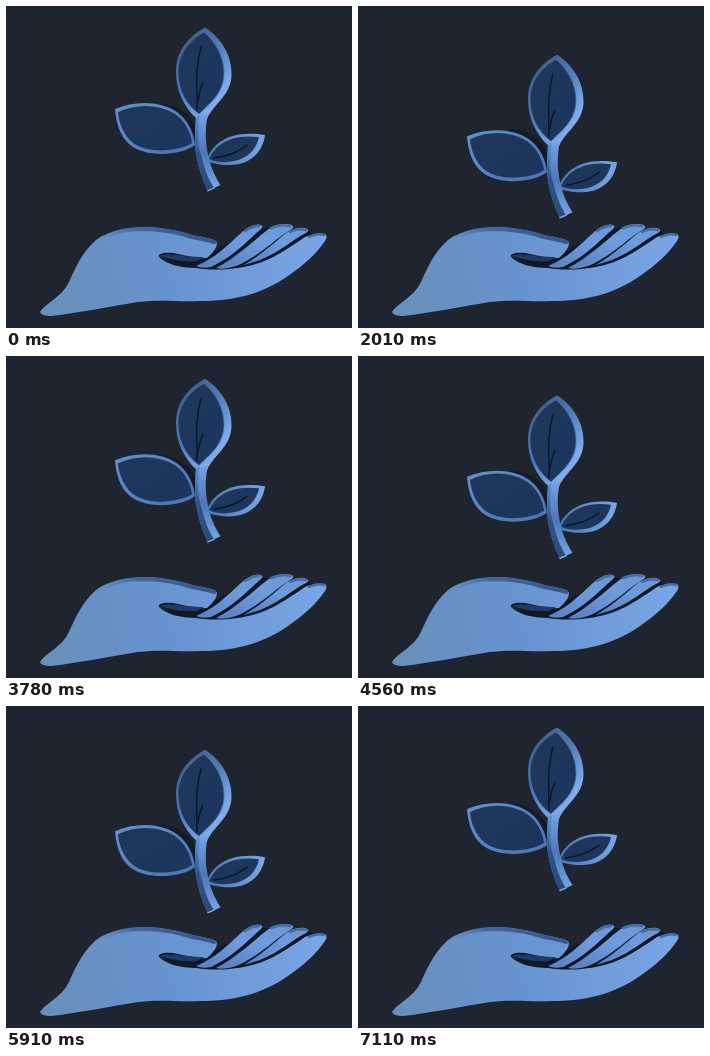
Recreate the animation shown at these times as an HTML page. Size 346 px wide and 322 px high, loop 7.14 s.

```html
<!DOCTYPE html>
<html lang="en">
<head>
<meta charset="utf-8">
<title>Hand and floating sprout</title>
<style>
  html, body { margin: 0; width: 100%; height: 100%; overflow: hidden; background: #1e2530; }
  svg { display: block; width: 346px; height: 322px; }
</style>
</head>
<body>
<svg viewBox="0 0 346 322" fill="none" stroke-linecap="round" stroke-linejoin="round">
  <defs>
    <linearGradient id="palm" gradientUnits="userSpaceOnUse" x1="40" y1="300" x2="320" y2="235">
      <stop offset="0" stop-color="#6890bb"/>
      <stop offset=".45" stop-color="#6793d0"/>
      <stop offset="1" stop-color="#7aa6e6"/>
    </linearGradient>
    <linearGradient id="bevel" gradientUnits="userSpaceOnUse" x1="95" y1="0" x2="212" y2="0">
      <stop offset="0" stop-color="#4a72a8" stop-opacity="0"/>
      <stop offset=".3" stop-color="#41669d"/>
      <stop offset="1" stop-color="#35568c"/>
    </linearGradient>
    <linearGradient id="finger" x1="0" y1="1" x2="1" y2="0">
      <stop offset="0" stop-color="#5580be"/>
      <stop offset=".6" stop-color="#6f9cdd"/>
      <stop offset="1" stop-color="#6a96d4"/>
    </linearGradient>
    <linearGradient id="face" x1="0" y1="0" x2="1" y2="1">
      <stop offset="0" stop-color="#20375a"/>
      <stop offset="1" stop-color="#1b355f"/>
    </linearGradient>
    <linearGradient id="leftRim" x1="0" y1="0" x2="1" y2="1">
      <stop offset="0" stop-color="#6490cc"/>
      <stop offset="1" stop-color="#4a74b0"/>
    </linearGradient>
    <linearGradient id="rightRim" x1="0" y1="0" x2="1" y2="0">
      <stop offset="0" stop-color="#4a74b0"/>
      <stop offset="1" stop-color="#7ba7e6"/>
    </linearGradient>
    <linearGradient id="topRim" gradientUnits="userSpaceOnUse" x1="172" y1="40" x2="222" y2="78">
      <stop offset="0" stop-color="#435d80"/>
      <stop offset=".5" stop-color="#4f7ab6"/>
      <stop offset="1" stop-color="#7fabe9"/>
    </linearGradient>
    <linearGradient id="stemFront" x1="0" y1="0" x2="0" y2="1">
      <stop offset="0" stop-color="#6694d4"/>
      <stop offset=".5" stop-color="#2f5388"/>
      <stop offset="1" stop-color="#294a7c"/>
    </linearGradient>
    <linearGradient id="stemSide" x1="0" y1="0" x2="0" y2="1">
      <stop offset="0" stop-color="#75a2e2"/>
      <stop offset=".5" stop-color="#4c78b8"/>
      <stop offset="1" stop-color="#7ba7e6"/>
    </linearGradient>
  </defs>

  <g id="hand">
    <path fill="#0e1828" d="M152 247 L206 246 L250 222 L284 222 L300 225 L314 230 L275 262 L215 268 L170 262Z"/>
    <path fill="url(#palm)" d="M34 306 C42 295 55 292 63 276 C71 258 77 246 90 234
      C103 224 125 221 141 221 C160 222 174 225 186 229 C195 231 205 232 210 235
      C213 239 208 246 201 252 C192 253 178 249 167 247 C158 246 151 248 153 251
      C160 258 174 262 190 262 C214 266 240 262 256 256 C272 250 287 239 299 231
      Q311 226 319 228 Q322 230 319 235 C310 248 298 259 282 270
      C260 285 234 295 195 295 C170 296 156 293 132 296 C105 300 73 307 45 310 Q35 310 34 306Z"/>
    <path stroke="url(#bevel)" stroke-width="4" d="M97 232 C112 224 125 223 141 223 C160 224 174 227 186 231 C195 233 204 234 208 236"/>
    <path fill="#213b63" d="M154 250 C166 246 182 252 198 251 L191 255 C178 256 165 254 154 250Z"/>
    <g fill="url(#finger)">
      <path d="M190 260 C208 253 222 239 235 227 Q243 219 252 218.500 Q259 219 255 223 C243 233 230 249 205 261 Q196 263 190 260Z"/>
      <path d="M210 262 C231 251 246 236 260 225 Q269 217 281 218 Q290 219 286 223 C268 233 256 249 230 260 Q219 264 210 262Z"/>
      <path d="M238 259 C256 248 269 236 280 227 Q289 221 299 222 Q305 224 300 227 C286 234 274 246 254 254Z"/>
    </g>
    <g stroke="#456ca4" stroke-width="2.500">
      <path d="M239 225 Q246 220 253 220"/>
      <path d="M265 222 Q274 218 284 220"/>
      <path d="M284 226 Q292 222 300 224"/>
      <path d="M303 231 Q311 227 318 229"/>
    </g>
  </g>

  <g id="sprout">
    <path id="shadow" fill="#131b2a" d="M150 98 C166 96 182 106 189 119 L191 140 L180 136Z"/>
    <path fill="url(#leftRim)" d="M109 103 C130 94 155 95 171 106 C182 114 188 127 189 139 C176 149 140 153 123 138 C114 130 110 117 109 103Z"/>
    <path fill="url(#face)" d="M112 106 C131 97 153 98 169 108 C179 115 185 127 186 137 C174 145 141 149 126 136 C118 129 113 118 112 106Z"/>

    <path fill="url(#rightRim)" d="M259 129 C257 144 247 156 230 158.500 C218 160 207 158 200 155 C205 139 222 123 259 129Z"/>
    <path fill="url(#face)" d="M253 131 C250 144 242 152 228 155 C218 157 209 156 203 153 C208 141 222 127 253 131Z"/>
    <path class="vein" d="M241 139 C233 145 226 149 208 152"/>

    <path fill="url(#topRim)" d="M199 21.500 C214 31 226 48 225.500 69 C225 90 207 98 201 113 L190 112 C178 101 170 85 170 66 C170 45 182 31 199 21.500Z"/>
    <path fill="url(#face)" stroke="#4671ae" stroke-width=".8" d="M198 26 C210 36 218 51 218 67 C218 87 204 97 193 108 C181 99 172 85 172 66 C172 48 183 34 198 26Z"/>
    <path class="vein" d="M195 41 C189 62 191 80 191 104"/>
    <path class="vein" d="M197 77 Q193 85 192 95"/>

    <path fill="url(#stemSide)" d="M190 111 L202 108 C198 126 200 140 203 153 C206 164 210 172 214.500 179 L202 185 C195 170 188 150 189 130Z"/>
    <path fill="url(#stemFront)" d="M190 111 L194 109 C192 124 191 138 196 152 C199 165 203 174 208 182 L202 185 C195 170 188 150 189 130Z"/>
    <path stroke="#78a4e3" stroke-width="1.500" d="M202 184.500 L208 182"/>
  </g>
</svg>
<style>
  .vein { stroke: #0a1424; stroke-width: 1.4; }
</style>
<script>
const LOOP = 7140, PERIOD = 3600, LEAD = 70, TRAVEL = 29;
const sprout = document.getElementById('sprout');
const shadow = document.getElementById('shadow');

function draw(time) {
  const phase = (time % LOOP + LEAD) / PERIOD * 2 * Math.PI;
  const drop = TRAVEL * (1 - Math.cos(phase)) / 2;
  sprout.setAttribute('transform', `translate(0 ${drop.toFixed(2)})`);
  // More of the leaf's upper side shows as it sinks.
  shadow.setAttribute('transform', `translate(0 ${(-drop * .06).toFixed(2)})`);
}

const start = performance.now();
function tick() {
  draw(performance.now() - start);
  requestAnimationFrame(tick);
}
tick();
</script>
</body>
</html>
```
